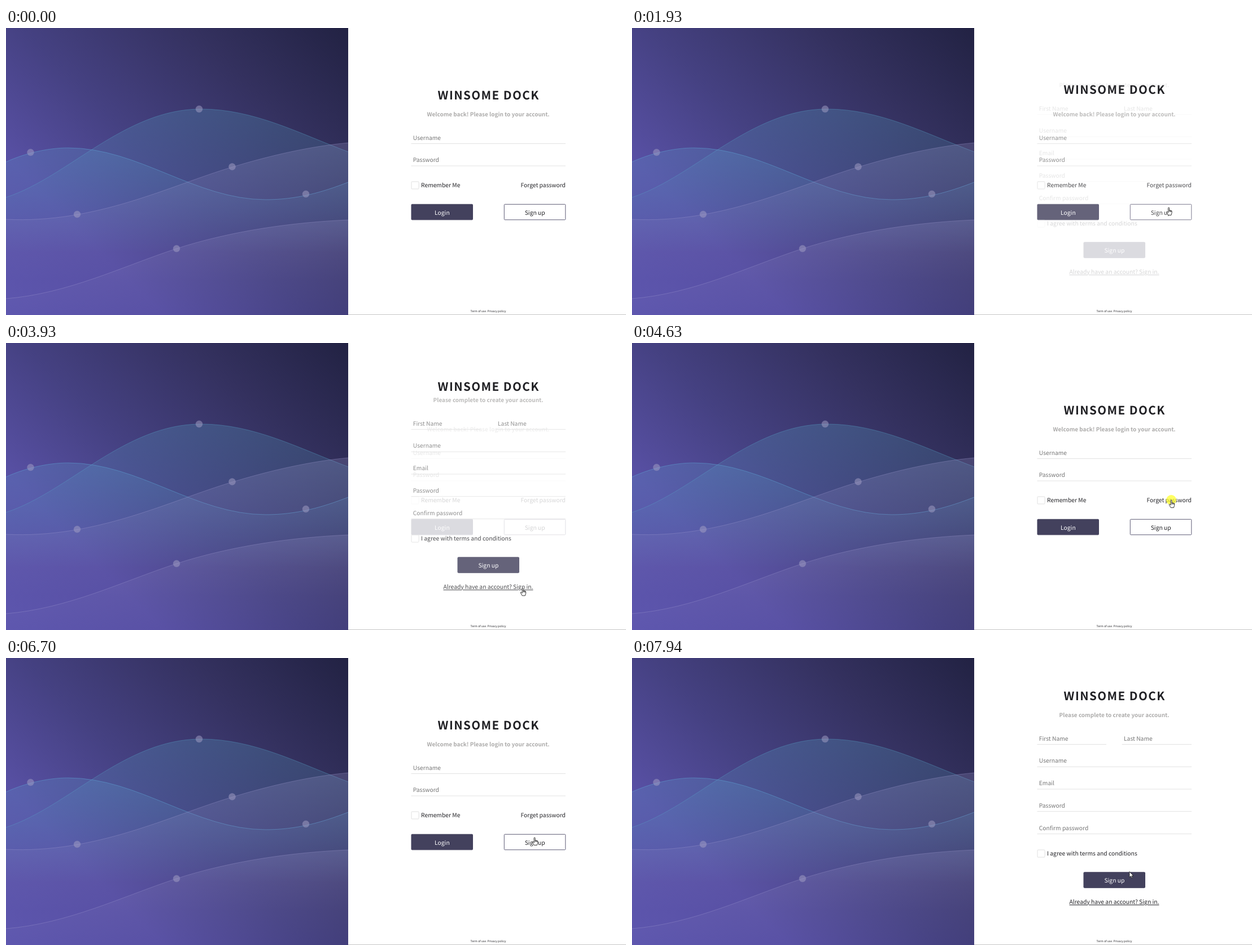
An HTML page for the animation above (8000 ms loop, 1098 px wide and 510 px high).

```html
<!DOCTYPE html>
<html lang="en">
<head>
<meta charset="utf-8">
<title>Login pages</title>
<style>
  html, body { margin: 0; width: 100%; height: 100%; overflow: hidden; background: #fff; }
  svg { display: block; width: 1098px; height: 510px; }
  text {
    font: 10.31px "Source Sans Pro", "Noto Sans CJK JP", "Noto Sans CJK SC", "Noto Sans CJK", "Noto Sans", sans-serif;
    fill: #242428; text-rendering: geometricPrecision;
  }
  .title { font-size: 20.6px; font-weight: 700; letter-spacing: 1.44px; fill: #202024; }
  .sub { font-size: 9.97px; font-weight: 700; fill: #adacab; }
  .hint { fill: #757575; }
  .light { fill: #fff; }
  .link { text-decoration: underline; }
  .foot { font-size: 5.1px; }
  .mid { text-anchor: middle; }
  .end { text-anchor: end; }
  .rule { stroke: #e2e2e2; }
  .box { fill: #fff; stroke: #e0e0e0; }
  .solid { fill: #43415d; stroke: #43415d; }
  .outline { fill: #fff; stroke: #5d5b75; }
  .wave { fill: none; stroke-width: 1; }
  .dot { fill: #a5a2c6; fill-opacity: .5; stroke: #8583b4; stroke-opacity: .35; }
  .cursor { fill: #fff; stroke: #222; stroke-width: .9; stroke-linejoin: round; stroke-linecap: round; }
</style>
</head>
<body>
<svg id="stage" viewBox="0 0 1098 510" xmlns="http://www.w3.org/2000/svg"></svg>
<script>
const LOOP = 8000, FADE = 260, CENTER = 854;

// ---- drawing helpers ----
const label = (x, y, str, cls = '') => `<text x="${x}" y="${y}" class="${cls}">${str}</text>`;
const centered = (y, str, cls = '') => label(CENTER, y, str, 'mid ' + cls);
const field = (y, str, x1 = 717.5, x2 = 991) =>
  label(x1 + 3.3, y - 7, str, 'hint') + `<path class="rule" d="M${x1} ${y}H${x2}"/>`;
const check = (y, str) =>
  `<rect class="box" x="718" y="${y}" width="13" height="13" rx="1"/>` + label(735, y + 10, str);
const button = (x, y, str, kind = 'solid') =>
  `<rect class="${kind}" x="${x}" y="${y}" width="108.5" height="27.5" rx="1.2"/>` +
  label(x + 54.4, y + 18.2, str, 'mid ' + (kind === 'solid' ? 'light' : ''));

const pages = {
  login: { titleY: 127, body:
    centered(157, 'Welcome back! Please login to your account.', 'sub') +
    field(205.5, 'Username') + field(245, 'Password') +
    check(273, 'Remember Me') + label(991, 283, 'Forget password', 'end') +
    button(718, 313.3, 'Login') + button(882.3, 313.3, 'Sign up', 'outline') },
  signup: { titleY: 75, body:
    centered(104.7, 'Please complete to create your account.', 'sub') +
    field(153.5, 'First Name', 717.5, 840) + field(153.5, 'Last Name', 867.7, 991) +
    field(193.3, 'Username') + field(233, 'Email') +
    field(272.7, 'Password') + field(312.6, 'Confirm password') +
    check(341, 'I agree with terms and conditions') +
    button(800, 380.8, 'Sign up') +
    centered(437.3, 'Already have an account? Sign in.', 'link') },
  forget: { titleY: 127, body:
    centered(157, 'Enter your email and we send you a password reset', 'sub') +
    centered(172, 'link.', 'sub') + field(220.3, 'Email') +
    button(800, 277.2, 'Send') +
    centered(333.5, 'Back to Sign in Page.', 'link') }
};

const waves = [
  { d: 'M0 301C110 265 210 144 345 144C440 144 520 188 606 220', color: '#56a0c4', top: 144, end: 400, fill: .27, line: .42 },
  { d: 'M0 238C35 222 75 213 110 213C235 213 335 305 460 305C515 305 560 292 606 274', color: '#5fa6d6', top: 205, end: 400, fill: .24, line: .5 },
  { d: 'M0 340C160 348 290 280 401 247C470 226 540 210 606 204', color: '#a09cd0', top: 200, end: 450, fill: .23, line: .36 },
  { d: 'M0 481C110 472 205 424 302 392C400 360 510 345 606 341', color: '#a09cd0', top: 335, end: 520, fill: .22, line: .36 }
];
const dots = [[342, 144], [43.5, 221], [400.5, 246.5], [531, 295], [126, 331], [302, 392]];

const waveFade = (w, i) =>
  `<linearGradient id="w${i}" gradientUnits="userSpaceOnUse" x1="0" x2="0" y1="${w.top}" y2="${w.end}">
    <stop stop-color="${w.color}" stop-opacity="${w.fill}"/>
    <stop offset="1" stop-color="${w.color}" stop-opacity="0"/></linearGradient>`;
const wave = (w, i) =>
  `<path d="${w.d}V510H0Z" fill="url(#w${i})"/>
   <path class="wave" d="${w.d}" stroke="${w.color}" stroke-opacity="${w.line}"/>`;

const cursors = {
  arrow: '<path d="M0 0V9.6L2.3 7.5L3.9 11L5.4 10.3L3.9 7H6.8Z"/>',
  hand: `<path d="M-1 1Q-1 0 0 0T1.1 1V5Q1.8 4.3 2.7 5.2Q3.7 4.6 4.2 5.7Q5.6 5.3 5.6 6.8V9.4L4.4 13.6H-.8
    L-3.6 8.6Q-4 7.3-2.7 7.4L-1 8.8Z"/><path fill="none" d="M1.1 5V7.2M2.7 5.4V7.4M4.2 5.8V7.6"/>`,
  beam: '<path fill="none" d="M-1.8-5.4Q0-5.4 0-4Q0-5.4 1.8-5.4M0-4V4M-1.8 5.4Q0 5.4 0 4Q0 5.4 1.8 5.4"/>'
};

const stage = document.getElementById('stage');
stage.innerHTML = `
  <defs>
    <linearGradient id="night" gradientUnits="userSpaceOnUse" x1="24" y1="534" x2="582" y2="-24">
      <stop stop-color="#5d56ae"/><stop offset=".25" stop-color="#5850a4"/>
      <stop offset=".48" stop-color="#454182"/><stop offset=".75" stop-color="#34315f"/>
      <stop offset="1" stop-color="#222243"/>
    </linearGradient>
    ${waves.map(waveFade).join('')}
  </defs>
  <rect width="1098" height="510" fill="#fff"/>
  <rect width="606" height="510" fill="url(#night)"/>
  ${waves.map(wave).join('')}
  ${dots.map(([x, y]) => `<circle class="dot" cx="${x}" cy="${y}" r="6"/>`).join('')}
  <g id="title">${label(CENTER + .7, 0, 'WINSOME DOCK', 'title mid')}</g>
  ${Object.entries(pages).map(([id, p]) => `<g id="${id}">${p.body}</g>`).join('')}
  ${centered(505.3, 'Term of use. Privacy policy', 'foot')}
  <path d="M606 509.5H1098" stroke="#c4c4c4"/>
  <circle id="glow" r="9" fill="#ffff28" fill-opacity=".72"/>
  <g id="pointer">${Object.entries(cursors).map(([id, c]) => `<g id="${id}" class="cursor">${c}</g>`).join('')}</g>`;

// ---- timeline ----
const swaps = [[-FADE, 'login'], [1860, 'signup'], [3860, 'login'], [4800, 'forget'], [6260, 'login'], [7350, 'signup']];
const presses = [1690, 3700, 4630, 6110, 7180];
const PRESS = 160;
const path = [
  [140, 1040, 506], [910, 953, 323], [1060, 952, 319], [2330, 950, 319], [2470, 941, 308],
  [2700, 941, 309], [3080, 923, 381], [3250, 923, 381], [3580, 915, 433], [4080, 915, 436],
  [4460, 955, 279], [5470, 955, 279], [5930, 884, 329], [6440, 884, 329],
  [6700, 936, 319], [6860, 942, 321], [7560, 942, 321], [7940, 881, 380]
];
const shapes = [
  [0, ''], [140, 'arrow'], [850, 'hand'], [1960, 'arrow'], [3450, 'hand'], [3980, 'arrow'], [4400, 'hand'],
  [4900, 'arrow'], [5860, 'beam'], [6100, 'hand'], [6360, 'arrow'], [6600, 'hand'], [7450, 'arrow']
];

const el = id => document.getElementById(id);
const clamp = v => Math.max(0, Math.min(1, v));
const ease = v => v * v * (3 - 2 * v);
const lastIndex = (table, t) => table.reduce((found, row, i) => row[0] <= t ? i : found, 0);

function pointAt(t) {
  const i = lastIndex(path, t), [t0, x0, y0] = path[i], [t1, x1, y1] = path[i + 1] || [LOOP, x0, y0];
  const k = ease(clamp((t - t0) / (t1 - t0)));
  return [x0 + (x1 - x0) * k, y0 + (y1 - y0) * k];
}

function drawPages(t) {
  const i = lastIndex(swaps, t), [start, now] = swaps[i], before = swaps[Math.max(0, i - 1)][1];
  const k = ease(clamp((t - start) / FADE));
  for (const id in pages) el(id).style.opacity = id === now ? k : id === before ? 1 - k : 0;
  const from = pages[before].titleY, to = pages[now].titleY;
  el('title').setAttribute('transform', `translate(0 ${from + (to - from) * k})`);
}

function drawPointer(t) {
  const at = `translate(${pointAt(t).map(v => v.toFixed(2)).join(' ')})`;
  const shape = shapes[lastIndex(shapes, t)][1];
  el('pointer').setAttribute('transform', at);
  el('glow').setAttribute('transform', at);
  for (const id in cursors) el(id).style.display = id === shape ? '' : 'none';
  el('glow').style.display = presses.some(p => t >= p && t < p + PRESS) ? '' : 'none';
}

const origin = performance.now();
function frame() {
  const t = (performance.now() - origin) % LOOP;
  drawPages(t);
  drawPointer(t);
  requestAnimationFrame(frame);
}
frame();
</script>
</body>
</html>
```
